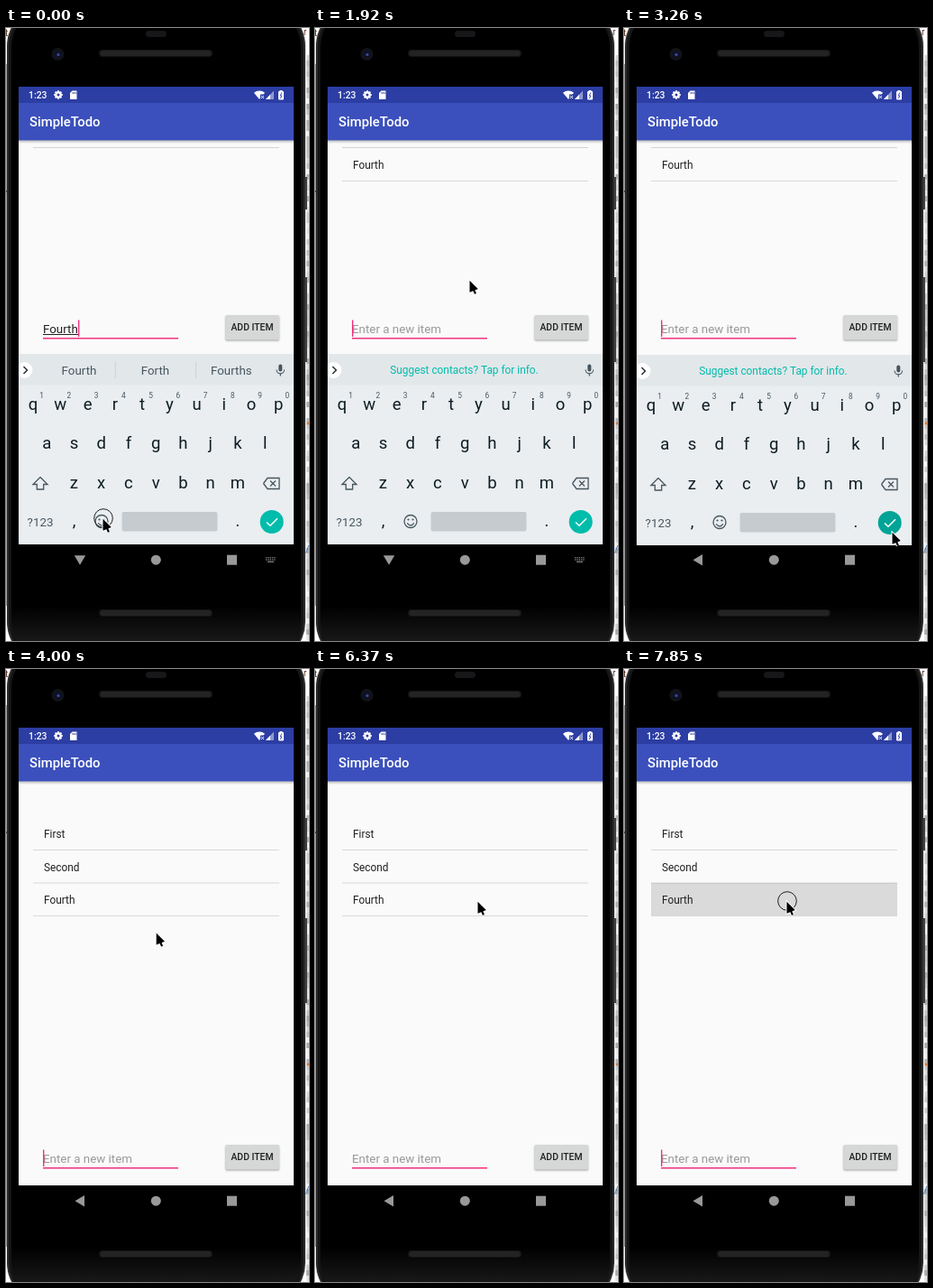
These frames come from a looping animation (336x679 px, 8 s). An HTML page with a canvas:

```html
<!DOCTYPE html>
<html lang="en">
<head>
<meta charset="utf-8">
<title>Todo app demo</title>
<style>
html, body { margin: 0; width: 100%; height: 100%; overflow: hidden; background: #000; }
canvas { display: block; width: 336px; height: 679px; }
</style>
</head>
<body>
<canvas id="stage"></canvas>
<script>
const W = 336, H = 679, LOOP = 8000, STEPS = 54, STEP = LOOP / STEPS;
const DP = 305 / 411;                 // app units to pixels
const ROW = 36.5, KEY_W = 30.25, KEY_H = 43.9;
const BOTTOM = 572;                   // lower end of the app area
const CLEARED = 6, HINTED = 8, ENTER = 21, CLOSED = 23, HELD = 51;

const canvas = document.getElementById('stage');
const c = canvas.getContext('2d');
const dpr = window.devicePixelRatio || 1;
canvas.width = W * dpr;
canvas.height = H * dpr;

const TEAL = '#00bcaa', PINK = '#f2317f', INK = '#212121', KEY = '#0e1c22',
      SLATE = '#47565e', BLUE = '#2c3da3', NAV = '#999';

const moves = [
  { from: 0, to: 4, x: 275, y: 334 },
  { from: 8, to: 13, x: 171, y: 279 },
  { from: 16, to: 20, x: 297, y: 558 },
  { from: 23, to: 30, x: 155, y: 269 },
  { from: 34, to: 41, x: 180, y: 257 }
];

function pointerAt(k) {
  let x = 107, y = 543;
  for (const m of moves) {
    const f = Math.min(1, Math.max(0, (k - m.from) / (m.to - m.from)));
    const e = 1 - (1 - f) ** 3;
    x += (m.x - x) * e;
    y += (m.y - y) * e;
  }
  return [x, y];
}

function rect(x, y, w, h, fill) {
  c.fillStyle = fill;
  c.fillRect(x, y, w, h);
}

function round(x, y, w, h, r, fill) {
  c.beginPath();
  c.roundRect(x, y, w, h, r);
  c.fillStyle = fill;
  c.fill();
}

function disc(x, y, r, fill) {
  c.beginPath();
  c.arc(x, y, r, 0, 7);
  c.fillStyle = fill;
  c.fill();
}

function arc(x, y, r, color, width = 1, a = 0, b = 2 * Math.PI) {
  c.beginPath();
  c.arc(x, y, r, a, b);
  c.strokeStyle = color;
  c.lineWidth = width;
  c.stroke();
}

function trace(points) {
  c.beginPath();
  for (let i = 0; i < points.length; i += 2) c.lineTo(points[i], points[i + 1]);
}

function poly(points, fill) {
  trace(points);
  c.fillStyle = fill;
  c.fill();
}

function line(points, color, width = 1) {
  trace(points);
  c.strokeStyle = color;
  c.lineWidth = width;
  c.stroke();
}

function cross(x, y, r, color, width) {
  line([x - r, y - r, x + r, y + r], color, width);
  line([x + r, y - r, x - r, y + r], color, width);
}

function fade(x0, y0, x1, y1, ...colors) {
  const g = c.createLinearGradient(x0, y0, x1, y1);
  colors.forEach((color, i) => g.addColorStop(i / (colors.length - 1), color));
  return g;
}

function text(s, x, y, size, color, align = 'left', weight = 400) {
  c.font = `${weight} ${size}px Roboto, sans-serif`;
  c.textAlign = align;
  c.fillStyle = color;
  c.fillText(s, x, y);
}

function drawBackdrop() {
  rect(0, 0, W, H, '#fff');
  rect(0, 40, 3, 600, '#a6a6a6');
  rect(0, 180, 4, 2, '#555');
  let seed = 7;
  for (let y = 30; y < H; y += 6) {
    seed = seed * 16807 % 2147483647;
    const v = 170 + seed % 80;
    rect(333, y, 3, 6, `rgb(${v},${v},${v})`);
  }
  text('t', -1, 9, 10, '#5a2a1a');
  text('r', 330, 8, 10, '#5a2a1a');
  text('/', 332, 581, 11, '#2b78c4');
  disc(335, 438, 1.5, '#e08040');
  rect(330, 165, 4, 36, '#444');
  rect(330, 276, 4, 94, '#444');
}

function drawSpeaker(y) {
  round(103, y, 126, 8, 4, '#151515');
  round(104.5, y + 1, 123, 6, 3, '#232323');
}

function drawPhone() {
  round(1, -25, 331, 728, 45, '#2c2c2e');
  round(3, -23, 327, 724, 43, '#151516');
  round(6, -20, 321, 718, 40, fade(0, 640, 0, H, '#000', '#181818'));
  round(155, 3, 23, 7, 3.5, '#17171a');
  drawSpeaker(24);
  drawSpeaker(644);
  disc(57.5, 29, 7, '#121318');
  disc(57.5, 29, 4, '#0f1226');
  disc(58, 29.5, 1.6, '#3c4c9c');
}

function drawStatus() {
  text('1:23', 25, 78, 14 * DP, '#fff', 'left', 500);
  for (let i = 0; i < 8; i++) {
    const a = i * Math.PI / 4;
    line([58, 74, 58 + Math.cos(a) * 4.8, 74 + Math.sin(a) * 4.8], '#fff', 2);
  }
  arc(58, 74, 2.7, '#fff', 2.2);
  disc(58, 74, 1.5, BLUE);

  poly([73.5, 69.5, 78.5, 69.5, 78.5, 79, 71, 79, 71, 72], '#fff');
  for (let i = 0; i < 3; i++) rect(73.5 + i * 1.7, 71, .8, 2, BLUE);

  c.beginPath();
  c.moveTo(281, 79);
  c.arc(281, 79, 9.5, -Math.PI * .72, -Math.PI * .28);
  c.fillStyle = '#fff';
  c.fill();
  rect(282, 73.5, 5, 5.5, BLUE);
  cross(284.5, 76.5, 1.5, '#fff', 1);

  poly([297, 69.5, 297, 79, 288, 79], '#8f98cd');
  poly([293, 73.7, 293, 79, 288, 79], '#fff');
  round(302, 70, 6, 9.5, 1, '#fff');
  rect(303.5, 69, 3, 2, '#fff');
  line([305.8, 71.5, 304.2, 75, 305.8, 75, 304.4, 78], BLUE, .9);
}

function drawAppBar() {
  rect(14, 65, 305, BOTTOM - 65, '#fafafa');
  rect(14, 124, 305, 4, fade(0, 124, 0, 128, 'rgba(0,0,0,.28)', 'rgba(0,0,0,0)'));
  rect(14, 65, 305, 18, BLUE);
  rect(14, 83, 305, 41.4, '#3b50bc');
  drawStatus();
  text('SimpleTodo', 26, 109, 20 * DP, '#fff', 'left', 500);
}

function drawItem(name, bottom, fill) {
  if (fill) rect(30, bottom - ROW, 273, ROW, fill);
  text(name, 42, bottom - 13.2, 16 * DP, INK);
  rect(30, bottom - .5, 273, 1, '#d9d9d9');
}

function drawList(k) {
  if (k < CLOSED) {
    rect(30, 132, 273, 1, '#d3d3d3');
    if (k >= CLEARED) drawItem('Fourth', 169.5);
    return;
  }
  const held = Math.max(0, Math.min(1, (k - HELD) / 2));
  ['First', 'Second', 'Fourth'].forEach((name, i) =>
    drawItem(name, 200.5 + i * ROW, i === 2 && held && `rgba(0,0,0,${.13 * held})`));
}

function drawForm(k) {
  const typed = k < CLEARED;
  const caretOn = typed || Math.floor((k * STEP - 830) / 500) % 2 === 0;
  const pressed = k === 5 || k === 6;
  c.save();
  c.translate(0, k < CLOSED ? 0 : 209);
  if (typed) {
    text('Fourth', 41, 338, 18 * DP, INK);
    rect(41, 339, 39, 1, INK);
  } else {
    text('Enter a new item', 41, 338, 18 * DP, '#999');
  }
  rect(41, 343, 150, 1.5, PINK);
  if (caretOn) rect(typed ? 80 : 41, 323.5, 1.4, 18.5, PINK);

  c.shadowColor = 'rgba(0,0,0,.35)';
  c.shadowBlur = (pressed ? 4 : 2) * dpr;
  c.shadowOffsetY = dpr;
  round(243.5, 318, 59.5, 27.5, 1.5, pressed ? '#bbb' : '#d6d7d7');
  c.shadowColor = 'transparent';
  text('ADD ITEM', 273, 335, 14 * DP, INK, 'center', 500);
  c.restore();
}

function drawStrip(k) {
  rect(14, 361, 305, 34.5, '#e2e7ea');
  disc(20.5, 379, 9, '#fff');
  line([19.5, 375, 23.5, 379, 19.5, 383], '#263238', 1.5);
  if (k < HINTED) {
    ['Fourth', 'Forth', 'Fourths'].forEach((word, i) => {
      text(word, 81 + i * 84.4, 384, 18 * DP, SLATE, 'center');
      if (i) rect(31.5 + i * 89.3, 370, 1, 18, '#ccd2d6');
    });
  } else {
    text('Suggest contacts? Tap for info.', 165.5, 383, 16 * DP, TEAL, 'center');
  }
  round(302.3, 372.5, 4, 8, 2, SLATE);
  arc(304.3, 378.5, 4.3, SLATE, 1.1, 0, Math.PI);
  rect(303.7, 382.5, 1.2, 3, SLATE);
}

function drawLetters() {
  ['qwertyuiop', 'asdfghjkl', 'zxcvbnm'].forEach((letters, row) => {
    [...letters].forEach((ch, i) => {
      const x = 166.2 + (i - (letters.length - 1) / 2) * KEY_W;
      text(ch, x, 422.5 + row * KEY_H, 25 * DP, KEY, 'center');
      if (!row) text((i + 1) % 10, x + 9.5, 409.5, 8.3, SLATE, 'center');
    });
  });
}

function drawShift(x, y) {
  const half = [[0, -8], [8, 0], [3.7, 0], [3.7, 5.5]];
  const mirror = half.map(([dx, dy]) => [-dx, dy]).reverse();
  line([...half, ...mirror].flatMap(([dx, dy]) => [x + dx, y + dy]), SLATE, 1.3);
}

function drawBackspace(x, y) {
  line([x, y, x + 4.5, y - 6, x + 17.5, y - 6, x + 17.5, y + 6, x + 4.5, y + 6, x, y], SLATE, 1.3);
  cross(x + 10.5, y, 3, SLATE, 1.3);
}

function drawSmiley(x, y) {
  arc(x, y, 7, SLATE, 1.3);
  for (const side of [-1, 1]) disc(x + side * 2.5, y - 2, 1.1, SLATE);
  arc(x, y + .5, 3.8, SLATE, 1.3, .3, Math.PI - .3);
}

function drawKeyboard(k) {
  c.save();
  c.beginPath();
  c.rect(14, 361, 305, BOTTOM - 360);
  c.clip();
  if (k === CLOSED - 1) c.translate(0, 1);
  rect(14, 361, 305, BOTTOM - 361, '#eaeef1');
  drawStrip(k);
  drawLetters();
  drawShift(38, 505.5);
  drawBackspace(285.5, 504.5);
  text('?123', 38, 551.5, 18 * DP, SLATE, 'center');
  text(',', 75.5, 552, 25 * DP, KEY, 'center');
  text('.', 257, 552, 25 * DP, KEY, 'center');
  drawSmiley(106, 546.5);
  round(128.5, 536, 106, 21.5, 2, '#c6cbcf');
  disc(294.7, 547, 13, k >= ENTER ? '#00a496' : TEAL);
  line([289, 547.5, 293, 551.3, 301, 543.3], '#fff', 1.5);
  c.restore();
}

function drawNav(k) {
  const typing = k < CLOSED - 1;
  c.save();
  c.translate(82, 589.2);
  if (!typing) c.rotate(Math.PI / 2);
  poly([-6.2, -5, 6.2, -5, 0, 5.5], NAV);
  c.restore();
  if (typing) {
    for (let i = 0; i < 10; i++) rect(288 + i % 5 * 2.3, i < 5 ? 586 : 588.3, 1.4, 1.4, '#777');
    rect(290, 590.6, 7, 1.4, '#777');
  }
  disc(166.3, 589.2, 5.5, NAV);
  rect(245, 583.7, 11, 11, NAV);
}

function drawPointer(k) {
  const [x, y] = pointerAt(k);
  if (k === 0 || k === 5 || k === ENTER || k >= HELD) arc(x + 1, y, 10.3, '#222');
  c.save();
  c.translate(x + .5, y + .8);
  for (const [color, grow] of [['#fff', 2], ['#000', 0]]) {
    line([4, 9, 6.4, 14.6], color, 2.2 + grow);
    poly([0, 0, 0, 13, 9.3, 9.3], color);
    c.closePath();
    c.lineWidth = grow;
    if (grow) c.stroke();
  }
  c.restore();
}

function draw(ms) {
  const k = Math.min(STEPS - 1, Math.floor((ms % LOOP + 8) / STEP));
  c.setTransform(dpr, 0, 0, dpr, 0, 0);
  drawBackdrop();
  drawPhone();
  drawAppBar();
  drawList(k);
  drawForm(k);
  if (k < CLOSED) drawKeyboard(k);
  drawNav(k);
  drawPointer(k);
}

const start = performance.now();
function tick() {
  draw(performance.now() - start);
  requestAnimationFrame(tick);
}
tick();
</script>
</body>
</html>
```
